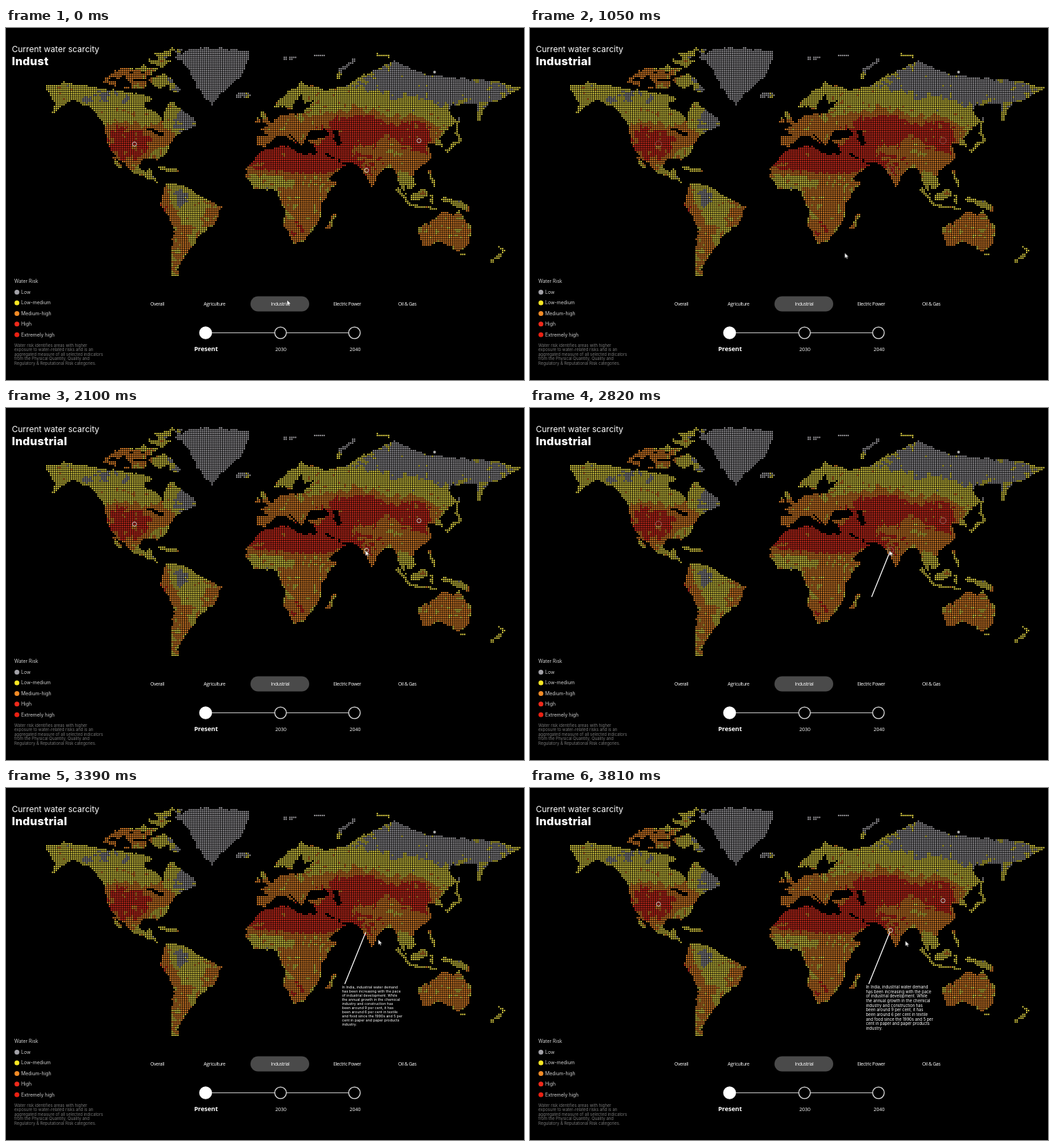
Recreate the animation shown at these times as an HTML page with a canvas. Size 750 by 511 pixels, loop 3.84 s.

```html
<!DOCTYPE html>
<html lang="en">
<head>
<meta charset="utf-8">
<title>Current water scarcity</title>
<style>
  html, body { margin: 0; width: 100%; height: 100%; overflow: hidden; background: #000; }
  canvas, svg { position: absolute; left: 0; top: 0; width: 750px; height: 511px; }
  text { fill: #fff; white-space: pre; }
  .sans { font-family: Inter, sans-serif; }
  .ui { font-family: "Open Sans", "Noto Sans", sans-serif; text-anchor: middle; }
  .tab { font-size: 6.9px; letter-spacing: -.35px; }
  .year { font-size: 7px; }
  .key { font-size: 6.9px; }
  .key text { fill: #d0d0d0; }
  .note { font-size: 5.95px; }
  .note text { fill: #777; }
  .node { fill: #000; stroke: #ddd; stroke-width: 1.3; }
  .ring { fill: none; stroke: #ddd; stroke-width: .9; animation: pulse 1.92s linear infinite; }
  #lead { stroke: #fff; stroke-width: 1.3; stroke-dasharray: 81 90; animation: lead 3.84s infinite; }
  #tip { font-size: 5.85px; transform-origin: 486px 286px; animation: tip 3.84s linear infinite; }
  #cursor { fill: #fff; stroke: #222; stroke-width: .4; animation: move 3.84s infinite; }

  @keyframes pulse {
    0%, 10% { r: 3px; opacity: 1; }
    23% { r: 3.8px; opacity: .75; }
    50% { r: 4.4px; opacity: .4; }
    70% { r: 5px; opacity: 0; }
    70.1%, 80% { r: 2.5px; opacity: 0; }
    95%, 100% { r: 3px; opacity: 1; }
  }
  @keyframes lead {
    0%, 61% { stroke-dashoffset: 81.5; animation-timing-function: ease-out; }
    79%, 100% { stroke-dashoffset: 0; }
  }
  @keyframes tip {
    0%, 77% { transform: scale(.8); opacity: 0; }
    86% { opacity: 1; }
    99%, 100% { transform: scale(1); opacity: 1; }
  }
  @keyframes move {
    0%, 14.6% { transform: translate(407px, 395px); animation-timing-function: ease-in; }
    27.34% { transform: translate(455.5px, 327px); animation-timing-function: ease-out; }
    43%, 76% { transform: translate(520.5px, 207px); animation-timing-function: ease-in-out; }
    88.3% { transform: translate(539px, 220px); animation-timing-function: ease-out; }
    98%, 100% { transform: translate(543.5px, 222px); }
  }
</style>
</head>
<body>
<canvas id="map" width="750" height="511"></canvas>
<svg viewBox="0 0 750 511">
  <g class="sans">
    <text x="8.5" y="34.5" font-size="12">Current water scarcity</text>
    <text x="8.5" y="54" font-size="16.5" font-weight="800" letter-spacing=".2">Indust<tspan class="typed">r</tspan><tspan class="typed">i</tspan><tspan class="typed">a</tspan><tspan class="typed">l</tspan></text>
    <g class="key" id="key"><text x="12" y="370">Water Risk</text></g>
    <g class="note" id="note"></g>
  </g>

  <rect x="354" y="389.5" width="85" height="22" rx="11" fill="#4a4a4a"/>
  <g class="ui tab">
    <text x="219" y="403">Overall</text>
    <text x="302" y="403">Agriculture</text>
    <text x="397" y="403">Industrial</text>
    <text x="494" y="403">Electric Power</text>
    <text x="581" y="403">Oil &amp; Gas</text>
  </g>

  <path d="M289 442.5H504" stroke="#ccc" stroke-width="1.2"/>
  <circle cx="289" cy="442.5" r="9.3" fill="#fff"/>
  <circle class="node" cx="397.5" cy="442.5" r="8.4"/>
  <circle class="node" cx="504.5" cy="442.5" r="8.4"/>
  <g class="ui year">
    <text x="289.7" y="469" font-size="9" font-weight="700">Present</text>
    <text x="398" y="469">2030</text>
    <text x="505.5" y="469">2040</text>
  </g>

  <circle cx="620.5" cy="64" r="2" fill="#aaa"/>
  <circle class="ring" cx="186" cy="168.5"/>
  <circle class="ring" cx="598" cy="163.5"/>
  <circle class="ring" cx="522" cy="206.5"/>
  <path id="lead" d="M520.8 209.5L490.5 284.5"/>
  <g class="sans" id="tip"></g>
  <path id="cursor" d="M0 0V7.4L1.8 5.8 3 8.5 4.2 8 3.1 5.4H5.5Z"/>
</svg>
<script>
const W = 750, H = 511, PITCH = 2.75, LOOP = 3840;
const LEVELS = ['#9e9ca0', '#e8da46', '#ee8a2c', '#e63020'];

// Seeded value noise
const hash = (x, y) => {
  const s = Math.sin(x * 127.1 + y * 311.7) * 43758.5453;
  return s - Math.floor(s);
};
const mix = (a, b, t) => a + (b - a) * t;
function noise(x, y) {
  const i = Math.floor(x), j = Math.floor(y), u = x - i, v = y - j;
  return mix(mix(hash(i, j), hash(i + 1, j), u), mix(hash(i, j + 1), hash(i + 1, j + 1), u), v);
}

// Land mask: opaque is solid land, half transparent is broken up by noise.
const mask = Object.assign(document.createElement('canvas'), { width: W, height: H }).getContext('2d');
mask.lineCap = mask.lineJoin = 'round';
const land = pts => mask.fill(new Path2D(`M${pts}z`));
function strip(width, pts) {
  mask.lineWidth = width;
  mask.stroke(new Path2D(`M${pts}`));
}

function drawLand() {
  mask.globalAlpha = .5;
  land('140 78 165 56 196 60 200 44 235 30 260 31 225 60 254 90 240 99 210 82 200 88 160 86');
  mask.globalAlpha = 1;
  // The Americas and Greenland
  land('57 84 85 80 150 89 203 98 215 105 204 108 200 116 220 124 227 134 232 113 240 107 258 118 278 143 252 152 236 170 234 180 219 190 222 198 216 191 196 190 191 202 200 211 211 204 212 216 222 228 230 229 212 222 184 210 150 176 144 152 145 142 122 115 95 105 66 126 72 110');
  land('245 42 275 29 354 32 343 68 312 95 297 113 277 85 265 60');
  land('233 226 262 231 283 245 313 259 303 285 285 298 258 332 248 352 253 361 240 358 240 322 245 292 224 255');
  // Eurasia, Scandinavia, Africa, Australia
  land('364 170 363 157 382 158 371 148 400 126 432 124 445 108 462 92 486 87 505 76 560 49 608 68 715 79 746 88 718 104 697 112 684 138 682 110 645 112 641 120 651 137 628 160 633 173 612 166 616 190 590 210 594 228 586 235 576 226 582 245 572 230 562 206 550 204 537 217 530 234 519 208 503 196 486 194 466 182 493 200 466 221 446 172 436 163 468 158 466 150 445 147 434 157 430 173 408 152 421 168 402 156 386 161 376 173');
  land('390 117 392 108 428 80 462 91 446 107 432 110 430 98 420 106 413 122 402 113');
  land('348 216 350 203 370 178 408 172 425 183 450 184 470 222 482 222 458 255 456 277 440 300 430 311 417 313 404 288 405 268 393 235 360 235');
  land('598 292 630 271 636 265 648 274 657 264 675 295 669 317 656 324 632 311 604 317');
  // Islands, from wide to narrow
  strip(11, '593 246 607 240');
  strip(8, '635 248 668 262');
  strip(7, '336 98 350 98M372 125 379 139M475 274 467 290');
  strip(5, '364 132 364 137M567 235 584 253M614 210 621 229M616 244 618 253M653 153 659 162 640 178M480 74 486 60 504 48');
  strip(4, '586 259 624 262M715 318 720 324 704 340M158 189 166 203M223 204 249 209M402 45 419 43M448 41 460 41M539 39 556 42M655 131 655 149M660 330 663 330');
  // Inland seas
  mask.globalCompositeOperation = 'destination-out';
  strip(8, '478 152 481 167');
  strip(4, '206 147 226 155M464 182 474 190');
}

// Risk field: flat-topped patches (x, y, half width, half height, risk change)
const PATCHES = [
  [300, 65, 58, 60, -2], [440, 42, 75, 26, -2], [585, 75, 80, 30, -1],
  [680, 100, 60, 36, -.8], [262, 134, 22, 20, -.9], [150, 100, 55, 13, -.5],
  [248, 247, 17, 14, -.9],
  [172, 168, 36, 30, 1.7], [220, 160, 32, 22, .7], [165, 72, 42, 16, .9],
  [232, 270, 15, 40, 1.2], [252, 315, 16, 42, .6], [303, 268, 18, 22, .7],
  [400, 190, 72, 23, 1.9], [440, 250, 42, 65, .6], [418, 295, 17, 16, 1],
  [415, 147, 62, 26, .8], [478, 186, 34, 30, 1.7], [510, 146, 56, 25, 1.9],
  [590, 154, 34, 24, 1.8], [528, 195, 24, 32, 1.3], [590, 190, 40, 24, .8],
  [638, 295, 48, 36, .7]
];
function risk(x, y) {
  const base = PATCHES.reduce((sum, [cx, cy, rx, ry, d]) =>
    sum + d * Math.exp(-((((x - cx) / rx) ** 2 + ((y - cy) / ry) ** 2) ** 2)), 1.1);
  const grain = noise(x / 7, y / 6) + noise(x / 3.5 + 40, y / 3.5) - 1;
  return Math.min(3, Math.max(0, Math.round(Math.min(base, 3.1) + grain * .85)));
}

function drawMap() {
  drawLand();
  const out = document.getElementById('map').getContext('2d');
  const px = mask.getImageData(0, 0, W, H).data;
  for (let y = PITCH / 2; y < 370; y += PITCH) for (let x = PITCH / 2; x < W; x += PITCH) {
    const sx = Math.round(x + 4 * (noise(x / 6, y / 6) - .5));
    const sy = Math.round(y + 4 * (noise(x / 6 + 70, y / 6) - .5));
    const alpha = px[(sy * W + sx) * 4 + 3] / 255;
    if (alpha < .3 || alpha < .7 && noise(x / 9, y / 5) < .42) continue;
    out.fillStyle = LEVELS[risk(x, y)];
    out.beginPath();
    out.arc(x, y, 1.05, 0, 7);
    out.fill();
  }
}
drawMap();

// Labels
function add(parent, tag, attrs, text = '') {
  const el = document.createElementNS('http://www.w3.org/2000/svg', tag);
  for (const name in attrs) el.setAttribute(name, attrs[name]);
  el.textContent = text;
  document.getElementById(parent).append(el);
}
const paragraph = (id, x, y, step, lines) =>
  lines.forEach((line, i) => add(id, 'text', { x, y: y + i * step }, line));

[['Low', '#a3a2a8'], ['Low-medium', '#f8e724'], ['Medium-high', '#f28c26'],
 ['High', '#ee2a1b'], ['Extremely high', '#ea2012']].forEach(([label, fill], i) => {
  const y = 383.5 + i * 15.45;
  add('key', 'circle', { cx: 15.8, cy: y, r: 3.5, fill });
  add('key', 'text', { x: 22, y: y + 2.5 }, label);
});
paragraph('note', 12, 462.5, 6.6, [
  'Water risk identifies areas with higher',
  'exposure to water-related risks and is an',
  'aggregated measure of all selected indicators',
  'from the Physical Quantity, Quality and',
  'Regulatory & Reputational Risk categories.'
]);
paragraph('tip', 486.5, 291, 6.65, [
  'In India, industrial water demand',
  'has been increasing with the pace',
  'of industrial development. While',
  'the annual growth in the chemical',
  'industry and construction has',
  'been around 9 per cent, it has',
  'been around 6 per cent in textile',
  'and food since the 1990s and 5 per',
  'cent in paper and paper products',
  'industry.'
]);

// Typing: one more letter every 80 ms
document.querySelectorAll('.typed').forEach((el, i) => {
  const at = (60 + i * 80) / LOOP;
  el.animate([
    { fillOpacity: 0, offset: 0 }, { fillOpacity: 0, offset: at },
    { fillOpacity: 1, offset: at }, { fillOpacity: 1, offset: 1 }
  ], { duration: LOOP, iterations: Infinity });
});
</script>
</body>
</html>
```
